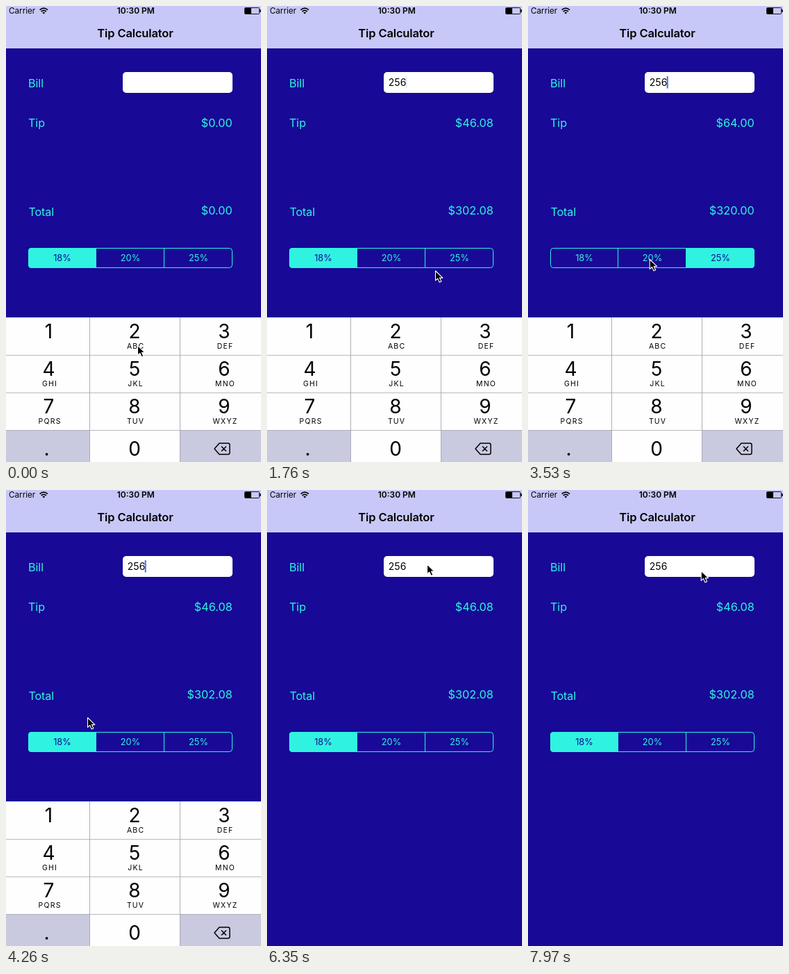
Recreate the animation shown at these times as an HTML page. Size 367 px wide and 656 px high, loop 8 s.

```html
<!DOCTYPE html>
<html lang="en">
<head>
<meta charset="utf-8">
<title>Tip Calculator</title>
<style>
  html, body { margin: 0; width: 100%; height: 100%; overflow: hidden; background: #180996; }
  svg { display: block; width: 100%; height: 100%; font-family: Inter, Roboto, sans-serif; }
  .row { font-size: 16.2px; fill: #2ff3e0; letter-spacing: -.1px; }
  .money { font-size: 16.3px; fill: #2ff3e0; text-anchor: end; }
  .mid { text-anchor: middle; }
  .seg { font-size: 12.8px; text-anchor: middle; }
  .digit { font-size: 28px; text-anchor: middle; }
  .abc { font-size: 10.5px; letter-spacing: 1.2px; text-anchor: middle; }
</style>
</head>
<body>
<svg viewBox="0 0 367 656">
  <clipPath id="round"><rect x="32" y="348" width="294" height="29" rx="4.5"/></clipPath>
  <rect width="367" height="656" fill="#180996"/>
  <rect width="367" height="61" fill="#c8c8f8"/>
  <text x="4" y="11.3" font-size="11.7">Carrier</text>
  <g fill="none" stroke="#000" stroke-width="1.7">
    <path d="M48.6 5.6Q54.3 .6 60 5.6"/>
    <path d="M50.7 8Q54.3 4.8 57.9 8"/>
  </g>
  <path d="M54.3 11.6L52.3 9.5Q54.3 7.9 56.3 9.5Z"/>
  <text class="mid" x="186.8" y="11.3" font-size="12" font-weight="600">10:30 PM</text>
  <rect x="343.5" y="2.5" width="21" height="9" rx="1" fill="none" stroke="#000" stroke-width=".9"/>
  <rect x="344" y="3" width="9" height="8"/>
  <rect x="365.3" y="5" width="1.5" height="4"/>
  <text class="mid" x="186" y="45" font-size="16.5" font-weight="600" letter-spacing="-.15">Tip Calculator</text>

  <text class="row" x="32" y="116.8">Bill</text>
  <text class="row" x="32" y="173.8">Tip</text>
  <text class="row" x="32.4" y="302">Total</text>
  <rect x="168" y="95" width="158" height="30" rx="5" fill="#fff"/>
  <text id="bill" x="174.8" y="115" font-size="14"></text>
  <rect id="caret" y="101" width="2" height="17.5" fill="#486cdf"/>
  <text class="money" id="tip" x="325.9" y="173.8"></text>
  <text class="money" id="total" x="325.9" y="299.8"></text>

  <g id="segments">
    <g clip-path="url(#round)"><rect id="fill" y="348" width="98" height="29" fill="#2ff3e0"/></g>
    <rect x="32.5" y="348.5" width="293" height="28" rx="4" fill="none" stroke="#2ff3e0"/>
    <path d="M129.5 348V377M227.5 348V377" stroke="#2ff3e0"/>
  </g>
  <g id="pad"></g>
  <path id="arrow" d="M.5 .5V14.4L3.7 11.5L6.3 17L8.9 15.8L6.4 10.6H10.9Z"
        stroke="#fff" stroke-width="1.1" stroke-linejoin="round"/>
</svg>
<script>
const LOOP = 8000, STEP = 147.2;
const TEAL = '#2ff3e0', NAVY = '#180996', GREY = '#c9cae0', WHITE = '#fefefe';
const AMOUNT = '256';
const $ = id => document.getElementById(id);
const clamp = (v, max = 1) => Math.max(0, Math.min(max, v));

function add(parent, tag, attrs, text) {
  const el = document.createElementNS('http://www.w3.org/2000/svg', tag);
  for (const name in attrs) el.setAttribute(name, attrs[name]);
  if (text) el.textContent = text;
  parent.appendChild(el);
  return el;
}

// Segmented control
const rates = [18, 20, 25];
const segX = i => 81 + 98 * i;
const labels = rates.map((r, i) => add($('segments'), 'text', { class: 'seg', x: segX(i), y: 367.2 }, r + '%'));

// Number pad
const pad = $('pad'), keys = {};
const letters = ['', 'ABC', 'DEF', 'GHI', 'JKL', 'MNO', 'PQRS', 'TUV', 'WXYZ'];
const edges = [0, 120.5, 250.5, 367], centers = [61.5, 185, 314];
['1', '2', '3', '4', '5', '6', '7', '8', '9', '.', '0', 'del'].forEach((key, i) => {
  const col = i % 3, x = centers[col], y = 448 + 54 * Math.floor(i / 3);
  const isDigit = key >= '0' && key <= '9';
  const box = add(pad, 'rect', {
    x: edges[col], y, width: edges[col + 1] - edges[col], height: 55, fill: isDigit ? WHITE : GREY
  });
  keys[key] = { box, x, y };
  if (isDigit) add(pad, 'text', { class: 'digit', x, y: y + (letters[i] || key === '1' ? 30 : 37) }, key);
  if (letters[i]) add(pad, 'text', { class: 'abc', x: x + 1.6, y: y + 45 }, letters[i]);
});
add(pad, 'circle', { cx: 58.6, cy: 644.8, r: 1.9 });
add(pad, 'path', {
  d: 'M307 629H319.5Q322 629 322 631.5V642.5Q322 645 319.5 645H307L300 637Z M310 633.5L317 640.5M317 633.5L310 640.5',
  fill: 'none', stroke: '#000', 'stroke-width': 1.5, 'stroke-linejoin': 'round'
});
add(pad, 'path', { d: 'M0 502.5H367M0 556.5H367M0 610.5H367M120.5 448V656M250.5 448V656', stroke: '#a9a9ae', 'stroke-width': .8 });

// Pointer stops: [step, x, y]. Keys are tapped every 3 steps, segments every 6.5.
const tapKey = (d, i) => [3 * i + 1, keys[d].x + 4, keys[d].y + 40];
const tapSegment = n => [7.5 + 6.5 * n, segX(n % 3) + 7, 364];
const stops = [
  ...[...AMOUNT].map(tapKey), [9, 308, 570], [12, 242, 380.5],
  tapSegment(1), [19, 256, 355.5], tapSegment(2), tapSegment(3),
  [29, 117, 327], [33, 162, 292], [37, 172, 368], [39, 186, 348],
  [43, 230, 106.5], [46, 184, 245], [48, 180, 264], [52, 245, 135], [54, 248.7, 116]
];

function pointAt(k) {
  const i = stops.findIndex(s => s[0] >= k);
  const b = stops[i], a = stops[Math.max(0, i - 1)];
  const p = clamp((k - a[0]) / (b[0] - a[0] || 1)), f = p * p * (3 - 2 * p);
  return [1, 2].map(n => a[n] + (b[n] - a[n]) * f);
}

// Keyboard closes, opens on the second focus, closes again
const CLOSE = 4800, OPEN = 6530, CLOSE_AGAIN = 7130;
const slide = (t, start) => 1 - (1 - clamp((t - start) / 400)) ** 3;

function caretAlpha(t) {
  if ((t > CLOSE && t < OPEN) || t > CLOSE_AGAIN) return 0;
  const phase = ((t > OPEN ? t - OPEN + 250 : t) / 1000) % 1;
  return clamp(Math.min((phase - .08) / .08, (.8 - phase) / .2));
}

function draw(now) {
  // the screen refreshes in even steps
  const k = Math.floor((now % LOOP) / STEP + .08), t = k * STEP;
  const bill = AMOUNT.slice(0, Math.floor((k + 1) / 3));
  const pick = Math.floor(clamp((k - 7.5) / 6.5, 3)) % 3;
  const tip = bill * rates[k < 14 ? 0 : pick] / 100;
  const pressed = k % 3 === 1 ? AMOUNT[(k - 1) / 3] : '';
  $('bill').textContent = bill;
  $('tip').textContent = '$' + tip.toFixed(2);
  $('total').textContent = '$' + (+bill + tip).toFixed(2);
  $('caret').setAttribute('x', 174.5 + 8.4 * bill.length);
  $('caret').setAttribute('opacity', caretAlpha(t));
  $('fill').setAttribute('x', 32 + 98 * pick);
  labels.forEach((label, i) => label.setAttribute('fill', i === pick ? NAVY : TEAL));
  for (const d of AMOUNT) keys[d].box.setAttribute('fill', d === pressed ? GREY : WHITE);
  const hidden = slide(t, CLOSE) - slide(t, OPEN) + slide(t, CLOSE_AGAIN);
  pad.setAttribute('transform', `translate(0 ${Math.round(208 * hidden)})`);
  $('arrow').setAttribute('transform', `translate(${pointAt(k).join(' ')})`);
}

const begin = performance.now();
function tick() {
  draw(performance.now() - begin);
  requestAnimationFrame(tick);
}
tick();
</script>
</body>
</html>
```
